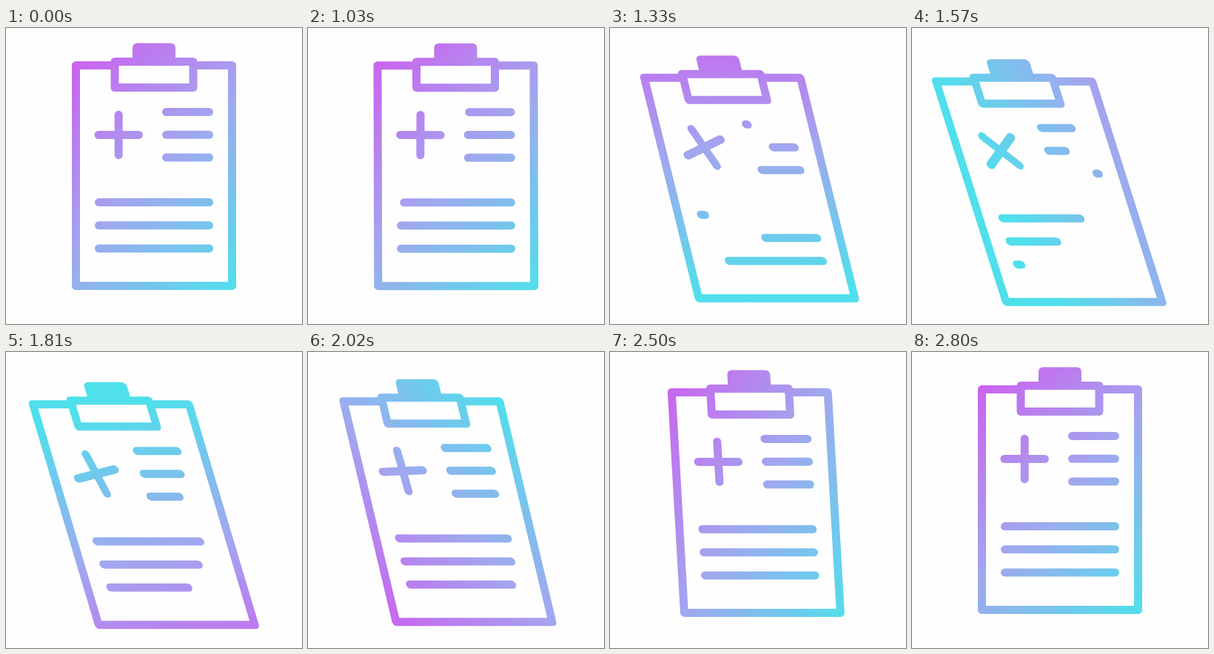
An HTML page with a canvas for the animation above (2830 ms loop, 400 px wide and 400 px high).

```html
<!DOCTYPE html>
<html lang="en">
<head>
<meta charset="utf-8">
<title>Medical clipboard</title>
<style>
  html, body { margin: 0; width: 100%; height: 100%; overflow: hidden; background: #fefefe; }
  canvas { display: block; width: 100vmin; height: 100vmin; }
</style>
</head>
<body>
<canvas id="stage" width="400" height="400"></canvas>
<script>
const ctx = document.getElementById('stage').getContext('2d');
const LOOP = 2830, REST = 1030, STEP = 30, BEGIN = 1000, END = 2800;
const PIVOT_Y = 245.5, MAX_SKEW = 0.318, MAX_DROP = 21.7;
const STOPS = ['#cb62ef', '#a0a8ee', '#4fe0eb'];

const span = (t, from, to) => Math.min(1, Math.max(0, (t - from) / (to - from)));

// cubic-bezier(1/3, 0, x2, 1)
function ease(u, x2) {
  if (u <= 0 || u >= 1) return u;
  let lo = 0, hi = 1, s;
  for (let i = 0; i < 24; i++) {
    s = (lo + hi) / 2;
    const x = (1 - s) ** 2 * s + 3 * (1 - s) * s * s * x2 + s ** 3;
    if (x < u) lo = s; else hi = s;
  }
  return s * s * (3 - 2 * s);
}

// The gradient makes one full turn and drifts along its axis on the way.
function gradient(t) {
  const angle = Math.PI * (0.25 + 2 * ease(span(t, BEGIN, END), 0.4));
  const drift = 0.31 * Math.exp(-(((t - 1570) / 250) ** 2));
  const point = k => [
    200 + Math.cos(angle) * 376 * (k - drift),
    200 + Math.sin(angle) * 376 * (k - drift)
  ];
  const g = ctx.createLinearGradient(...point(-0.5), ...point(0.5));
  STOPS.forEach((color, i) => g.addColorStop(i / 2, color));
  return g;
}

function stroke(...points) {
  ctx.beginPath();
  points.forEach(p => ctx.lineTo(...p));
  ctx.stroke();
}

function drawBoard() {
  stroke([147, 50.5], [94.5, 50.5], [94.5, 348.5], [305.5, 348.5], [305.5, 50.5], [253, 50.5]);
  ctx.strokeRect(147, 45.5, 106, 35);
  ctx.beginPath();
  ctx.roundRect(171, 20.5, 58, 26, [6, 6, 0, 0]);
  ctx.fill();
}

function drawPlus(t) {
  const turn = Math.PI * ease(span(t, BEGIN, 2200), 0.21);
  for (const a of [turn, turn + Math.PI / 2]) {
    const x = Math.cos(a) * 27.2, y = Math.sin(a) * 27.2;
    stroke([152.2 - x, 144.5 - y], [152.2 + x, 144.5 + y]);
  }
}

// Three staggered lines, each wiped away from the left, then written again.
function drawLines(t, left, top, gap, delay) {
  for (let i = 0; i < 3; i++) {
    const age = t - BEGIN - i * delay;
    const wiped = span(age, 0, 320) ** 1.5;
    const written = Math.tanh((age - 320) / 285);
    const at = k => [left + (274.5 - left) * k, top + i * gap];
    if (wiped < 1) stroke(at(wiped), at(1));
    else if (written > 0) stroke(at(0), at(written));
  }
}

function draw(now) {
  let t = now % LOOP;
  t = t < REST ? 0 : REST + Math.floor((t - REST) / STEP) * STEP;

  const lean = ease(span(t, BEGIN, 1600), 0.34) - ease(span(t, 1630, END), 0.7);
  const skew = MAX_SKEW * lean;

  ctx.setTransform(1, 0, 0, 1, 0, 0);
  ctx.fillStyle = '#fefefe';
  ctx.fillRect(0, 0, 400, 400);
  ctx.setTransform(1, 0, skew, 1, -skew * PIVOT_Y, MAX_DROP * lean);
  ctx.fillStyle = ctx.strokeStyle = gradient(t);
  ctx.lineWidth = 11;
  ctx.lineCap = ctx.lineJoin = 'round';
  drawBoard();
  drawPlus(t);
  drawLines(t, 216.5, 113.5, 30.8, 130);
  drawLines(t, 125.5, 235.6, 31.2, 120);
}

const start = performance.now();
function tick() {
  draw(performance.now() - start);
  requestAnimationFrame(tick);
}
tick();
</script>
</body>
</html>
```
